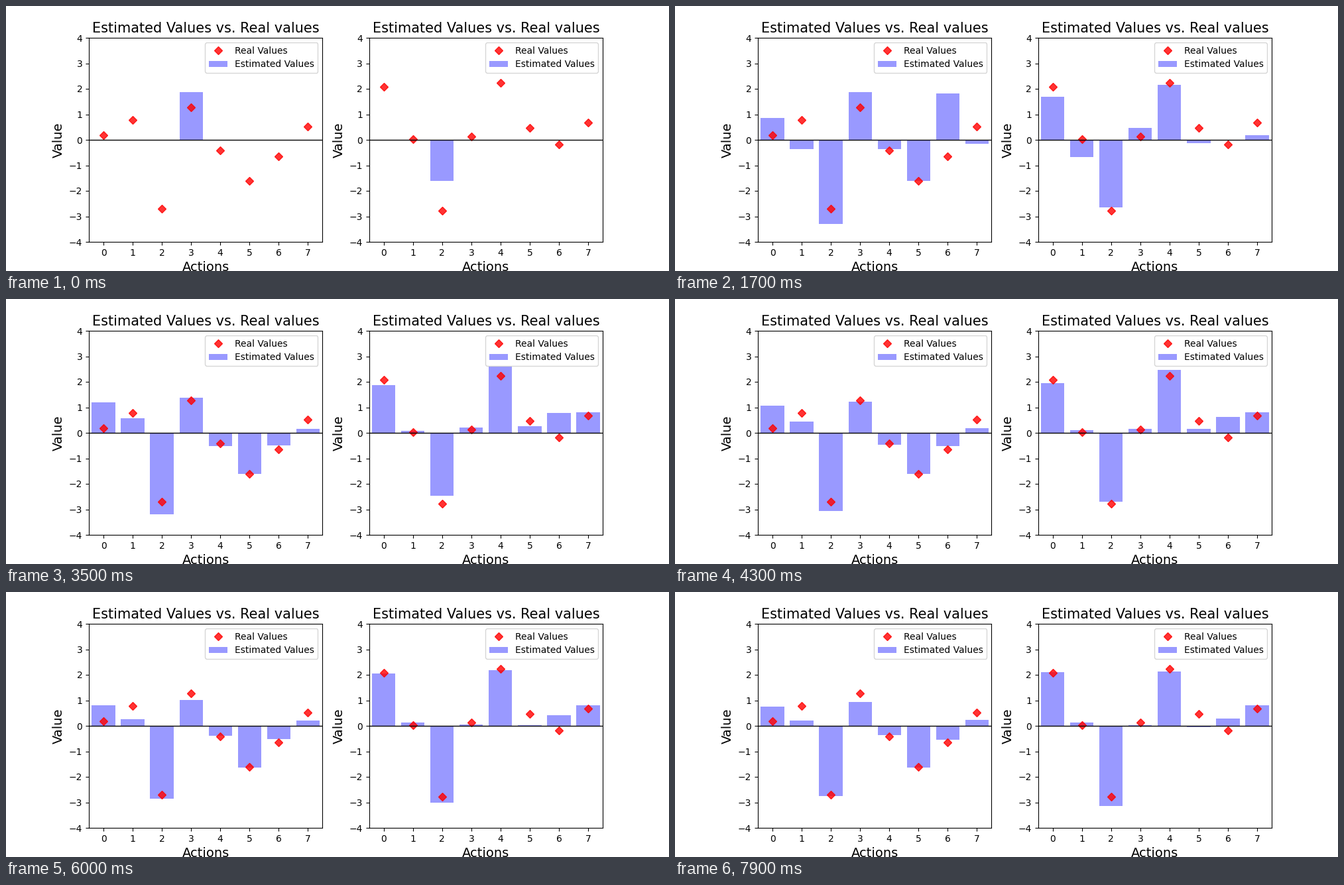
These frames come from a looping animation (1000x400 px, 8 s). A matplotlib script:

```python
import matplotlib.pyplot as plt
from matplotlib.animation import FuncAnimation
import numpy as np

FRAMES, INTERVAL = 80, 100
ARMS = 8

REAL_A = [0.18, 0.78, -2.70, 1.27, -0.41, -1.61, -0.65, 0.52]
REAL_B = [2.08, 0.03, -2.78, 0.13, 2.23, 0.47, -0.18, 0.68]

# Estimates reached after these steps
KEY_STEPS = [8, 17, 35, 79]
KEYS_A = [
    [0.86, -0.36, -3.22, 1.87, -1.01, -1.61, 0, 0.18],
    [0.86, -0.36, -3.30, 1.87, -0.36, -1.61, 1.82, -0.15],
    [1.20, 0.57, -3.19, 1.38, -0.52, -1.61, -0.49, 0.16],
    [0.75, 0.21, -2.76, 0.94, -0.36, -1.64, -0.54, 0.23],
]
KEYS_B = [
    [0, -1.12, -1.61, 0.96, 1.71, -1.22, 0, 0.57],
    [1.69, -0.67, -2.65, 0.47, 2.16, -0.13, 0, 0.18],
    [1.87, 0.08, -2.47, 0.21, 2.60, 0.26, 0.78, 0.81],
    [2.10, 0.14, -3.13, 0.03, 2.13, -0.04, 0.29, 0.81],
]


def ease_out(t):
    return 1 - (1 - t) ** 2


def learn(keys, first_arm, seed):
    """Heights for every step: one action is tried per step, in shuffled turns,
    and its estimate settles towards the next key value."""
    rng = np.random.default_rng(seed)
    now = np.zeros(ARMS)
    now[first_arm] = keys[0][first_arm]
    history = [now.copy()]
    begin = 0
    for end, goal in zip(KEY_STEPS, keys):
        base = now.copy()
        turns = np.resize(rng.permutation(ARMS), end - begin)
        total = np.bincount(turns, minlength=ARMS)
        tried = np.zeros(ARMS)
        for arm in turns:
            tried[arm] += 1
            part = ease_out(tried[arm] / total[arm])
            now[arm] = base[arm] + (goal[arm] - base[arm]) * part
            history.append(now.copy())
        begin = end
    return history


def setup(ax, real):
    actions = range(ARMS)
    ax.plot(actions, real, "rD", alpha=0.8, label="Real Values")
    bars = ax.bar(actions, np.zeros(ARMS), width=0.8, color="blue", alpha=0.4,
                  label="Estimated Values")
    ax.axhline(0, color="black", linewidth=1)
    ax.set_xlim(-0.5, ARMS - 0.5)
    ax.set_ylim(-4, 4)
    ax.set_xticks(actions)
    ax.set_yticks(range(-4, 5))
    ax.set_title("Estimated Values vs. Real values", fontsize=15)
    ax.set_xlabel("Actions", fontsize=14)
    ax.set_ylabel("Value", fontsize=14)
    ax.legend(loc="upper right")
    return bars


plt.rcParams["font.family"] = "DejaVu Sans"
fig, (ax_a, ax_b) = plt.subplots(1, 2, figsize=(10, 4), dpi=100)
panels = [
    (setup(ax_a, REAL_A), learn(KEYS_A, first_arm=3, seed=4)),
    (setup(ax_b, REAL_B), learn(KEYS_B, first_arm=2, seed=9)),
]


def update(n):
    for bars, history in panels:
        for bar, height in zip(bars, history[n]):
            bar.set_height(height)
    return [bar for bars, _ in panels for bar in bars]


anim = FuncAnimation(fig, update, frames=FRAMES, interval=INTERVAL,
                     repeat=True, repeat_delay=0, blit=False)
plt.show()
```
